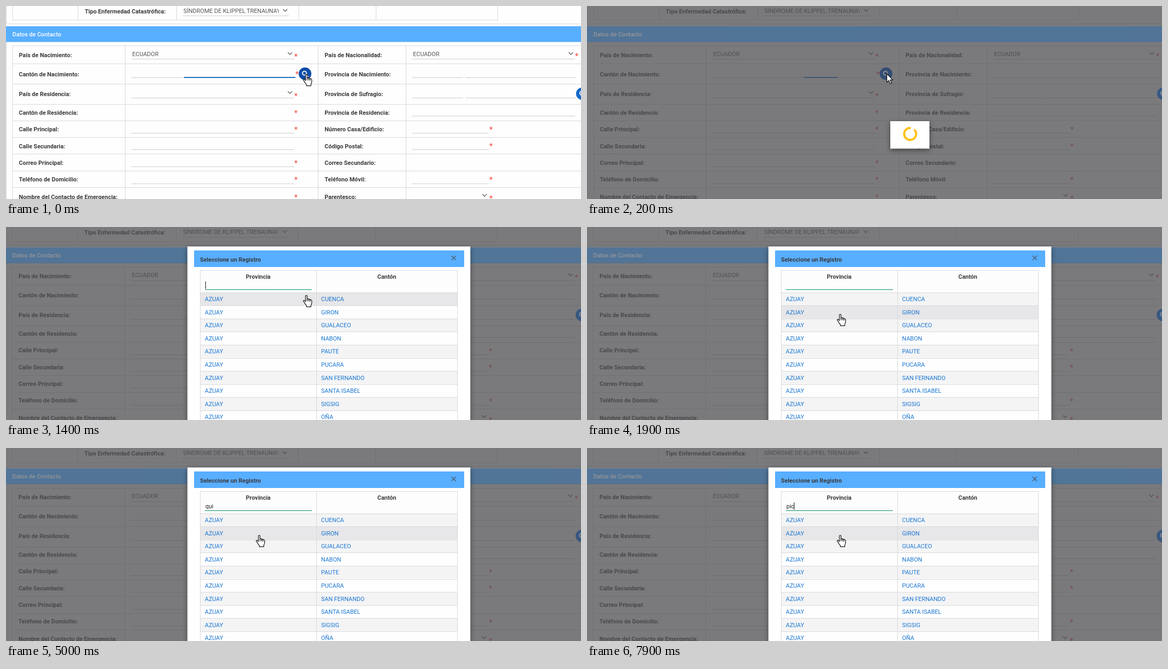
An HTML page for the animation above (8 s loop, 1073 by 362 pixels).

```html
<!DOCTYPE html>
<html lang="es">
<head>
<meta charset="utf-8">
<style>
html, body { margin: 0; width: 100%; height: 100%; overflow: hidden; background: #fff; }
svg { display: block; }
text { font: 11px Roboto, sans-serif; fill: #555; white-space: pre; }
.b { font-weight: 700; fill: #3b3b3d; }
.star { font-size: 14px; fill: #f44336; }
.link { fill: #1976d2; }
.line { fill: #d9d9db; shape-rendering: crispEdges; }
.field { fill: #cdcdd0; shape-rendering: crispEdges; }
.shadow { filter: drop-shadow(0 3px 5px rgba(0, 0, 0, .45)); }
.cursor path { stroke: #111; stroke-width: 1.2; stroke-linejoin: round; fill: #fff; }
</style>
</head>
<body>
<svg id="stage" width="1073" height="362" viewBox="0 0 1073 362"></svg>
<script>
const LOOP = 8000;
const stage = document.getElementById('stage');
const $ = id => document.getElementById(id);

const rect = (x, y, w, h, attrs) => `<rect x="${x}" y="${y}" width="${w}" height="${h}" ${attrs}/>`;
const text = (x, mid, str, cls = '') => `<text x="${x}" y="${mid + 3.9}" class="${cls}">${str}</text>`;
const hLine = (x1, x2, y, cls = 'line') => rect(x1, y, x2 - x1, 1, `class="${cls}"`);
const vLine = (x, y1, y2) => rect(x, y1, 1, y2 - y1, 'class="line"');
const star = (x, mid) => text(x - 3, mid + 3.2, '*', 'star');
const chevron = (x, y) =>
  `<path d="M${x - 4} ${y - 2}l4 4l4 -4" fill="none" stroke="#666" stroke-width="1.4"/>`;
const search = (x, y, color) => `<circle cx="${x}" cy="${y}" r="11.8" fill="${color}"/>
  <path d="M${x + 2} ${y + 2}l4 4" stroke="#fff" stroke-width="2"/>
  <circle cx="${x - 1}" cy="${y - 1}" r="3.7" fill="none" stroke="#fff" stroke-width="1.8"/>`;

// Each row: middle, left label, right label
const FORM = [
  [92, 'País de Nacimiento:', 'País de Nacionalidad:'],
  [128, 'Cantón de Nacimiento:', 'Provincia de Nacimiento:'],
  [165, 'País de Residencia:', 'Provincia de Sufragio:'],
  [200, 'Cantón de Residencia:', 'Provincia de Residencia:'],
  [231, 'Calle Principal:', 'Número Casa/Edificio:'],
  [263, 'Calle Secundaria:', 'Código Postal:'],
  [294, 'Correo Principal:', 'Correo Secundario:'],
  [325, 'Teléfono de Domicilio:', 'Teléfono Móvil:'],
  [358, 'Nombre del Contacto de Emergencia:', 'Parentesco:']
];
const CANTONS = ['CUENCA', 'GIRON', 'GUALACEO', 'NABON', 'PAUTE', 'PUCARA',
  'SAN FERNANDO', 'SANTA ISABEL', 'SIGSIG', 'OÑA'];
const ROW_TOP = 122.6, ROW_H = 24.6;

// The blue parts of the page
const accents = rect(0, 38, 1075, 29.5, 'fill="#58aeff"') +
  `<text x="12" y="56.9" style="fill:#fff;font-weight:500">Datos de Contacto</text>` +
  search(558, 127, '#0d4da8') + search(1075.5, 164.5, '#1668c8');

function page() {
  let s = rect(-2, -2, 1080, 370, 'fill="#fefefe"');
  s += [12, 134, 318, 546, 690, 917].map(x => vLine(x, -2, 26)).join('');
  s += hLine(12, 918, 26) + hLine(0, 1075, 33) + vLine(0, -2, 34);
  s += text(147, 10, 'Tipo Enfermedad Catastrófica:', 'b');
  s += `<svg x="331" y="0" width="178" height="20">${text(0, 9, 'SÍNDROME DE KLIPPEL TRENAUNAY')}</svg>`;
  s += hLine(330, 528, 18, 'field') + chevron(521, 8);

  s += vLine(0, 67, 364);
  s += [74, 108, 146, 184, 215, 246, 277, 309, 340].map(y => hLine(12, 1075, y)).join('');
  s += [12, 222, 582, 746].map(x => vLine(x, 74, 364)).join('');
  for (const [mid, left, right] of FORM) s += text(24, mid, left, 'b') + text(594.5, mid, right, 'b');

  for (const y of [99, 172, 238, 269, 301, 333]) s += hLine(234, 538, y, 'field');
  s += hLine(234, 330, 134, 'field') + hLine(332, 540, 134, 'field');
  for (const y of [99, 206]) s += hLine(758, 1062, y, 'field');
  for (const y of [134, 172]) s += hLine(758, 853, y, 'field') + hLine(857, 1064, y, 'field');
  for (const y of [238, 269, 333]) s += hLine(758, 901, y, 'field');

  s += text(235.5, 90, 'ECUADOR') + text(759.5, 90, 'ECUADOR');
  s += chevron(530, 89) + chevron(1054, 89) + chevron(530, 162) + chevron(893, 355);
  for (const y of [93, 167, 199, 230, 293, 324, 357]) s += star(541, y);
  for (const y of [230, 261, 324, 359]) s += star(905, y);
  s += star(543, 126) + star(1065, 92) + accents;
  return s + '<rect id="focus" y="133" height="2" fill="#1d6fc0"/>';
}

function dialog() {
  let s = rect(338.5, 36.5, 528, 340, 'fill="#fff" class="shadow"');
  s += rect(351, 44, 504, 31, 'fill="#58aeff"') + text(362, 61, 'Seleccione un Registro', 'b');
  s += '<path d="M831.5 54l8 8m0 -8l-8 8" stroke="#4d5a68" stroke-width="1.3"/>';
  s += rect(362, 81, 481, 41, 'fill="#fdfdfd"');
  CANTONS.forEach((name, i) => {
    const y = ROW_TOP + i * ROW_H;
    s += rect(362, y, 481, ROW_H, `id="row${i}"`) + hLine(362, 843, y);
    s += text(371, y + 12.5, 'AZUAY', 'link') + text(588, y + 12.5, name, 'link');
  });
  s += hLine(362, 843, 81) + [362, 579, 842].map(x => vLine(x, 81, 364)).join('');
  s += text(447.5, 93, 'Provincia', 'b') + text(693, 93, 'Cantón', 'b');
  s += '<rect id="underline" y="117" height="1"/>';
  s += '<text id="query" x="372" y="113" style="fill:#222"></text>';
  return s + '<rect id="caret" y="102" width="1" height="14" fill="#111" shape-rendering="crispEdges"/>';
}

const loader = rect(566, 216, 73, 51.5, 'fill="#fff" class="shadow"') +
  `<circle id="ring" cx="603" cy="240" r="11.2" fill="none" stroke="#ffc11a" stroke-width="4"
    pathLength="100" stroke-dasharray="90 10"/>`;
const hand = `<path d="M5 2Q5 .6 6.5 .6T8 2V7.3Q9.5 6.3 10.8 7.6Q12 7 13.3 8.6Q14.6 8 15.7 9.4Q16.6 10 16.6 11.5
  V14.5Q16.4 17 15 19V22H6.8V19.7Q4.2 17 2.8 14Q.6 11.4 1 10.5Q2.2 9.2 4 11L5 12.4Z"/>
  <path d="M8 7v4.5M10.8 7.8v4M13.4 8.8v3.4"/>`;
const arrow = '<path d="M.5 0V16L4.2 12.7L6.8 18.8L9.4 17.7L6.8 11.7H11.6Z"/>';

stage.innerHTML = `<g id="page">${page()}</g>
  <g id="overlay"><rect width="1073" height="362" fill="#4e4e52" opacity=".75"/>
    <g opacity=".2">${accents}</g></g>
  <g id="loader">${loader}</g><g id="dialog">${dialog()}</g>
  <g id="hand" class="cursor">${hand}</g>
  <g id="arrow" class="cursor" transform="translate(559 127)">${arrow}</g>`;

// [time, typed text, caret visible]
const TYPING = [
  [0, '', 1], [1600, '', 0], [2100, '', 1], [2600, '', 0],
  [3000, 'q', 1], [3500, 'q', 0], [3900, 'q', 1], [4400, 'qu', 1], [4500, 'qui', 1], [5000, 'qui', 0],
  [5300, 'qu', 0], [5500, 'q', 1], [5600, '', 1], [6000, '', 0],
  [6100, 'p', 1], [6500, 'pi', 1], [7000, 'pi', 0], [7500, 'pi', 1], [7900, 'pic', 1]
];
// [time, width] of the two focus lines
const BLUR = [[0, 208], [100, 176], [200, 62], [300, 0]];
const FOCUS = [[0, 0], [400, 11], [500, 150], [1400, 199], [1500, 200]];

const at = (steps, t) => steps.filter(s => s[0] <= t).pop();
const set = (id, attrs) => { for (const k in attrs) $(id).setAttribute(k, attrs[k]); };
const show = (id, on) => set(id, { visibility: on ? 'visible' : 'hidden' });
const span = (id, mid, width) => set(id, { x: mid - width / 2, width });

function draw(time) {
  const t = Math.floor(time / 100) * 100;
  const loading = t >= 200 && t < 400, open = t >= 400, settled = t >= 500;
  show('overlay', t >= 200);
  show('loader', loading);
  show('dialog', open);
  show('arrow', loading);
  show('hand', !loading);
  set('page', { transform: settled ? 'translate(-.8 .5)' : '' });
  set('dialog', { transform: settled ? '' : 'translate(0 -.5)' });
  set('ring', { transform: `rotate(${-48 + (t - 200) * .6} 603 240)` });
  span('focus', 436, at(BLUR, t)[1]);

  const p = Math.min(1, Math.max(0, (t - 1400) / 500)), k = p * p * (3 - 2 * p);
  const y = 127.7 + 35.5 * k;
  set('hand', { transform: `translate(${554 - 88 * k} ${y})` });
  const hover = Math.floor((y + 1 - ROW_TOP) / ROW_H);
  CANTONS.forEach((_, i) =>
    set('row' + i, { fill: i === hover ? '#e7e6e8' : i % 2 ? '#fefefe' : '#f4f4f5' }));

  span('underline', settled ? 471 : 470.5, at(FOCUS, t)[1]);
  set('underline', { fill: settled ? '#0b8f66' : '#3f97d3' });
  const [, typed, caret] = at(TYPING, t);
  $('query').textContent = typed;
  const width = typed ? $('query').getComputedTextLength() : 0;
  set('caret', { x: Math.floor(372 + width) });
  show('caret', open && caret);
}

const start = performance.now();
function tick() {
  draw((performance.now() - start) % LOOP);
  requestAnimationFrame(tick);
}
tick();
</script>
</body>
</html>
```
